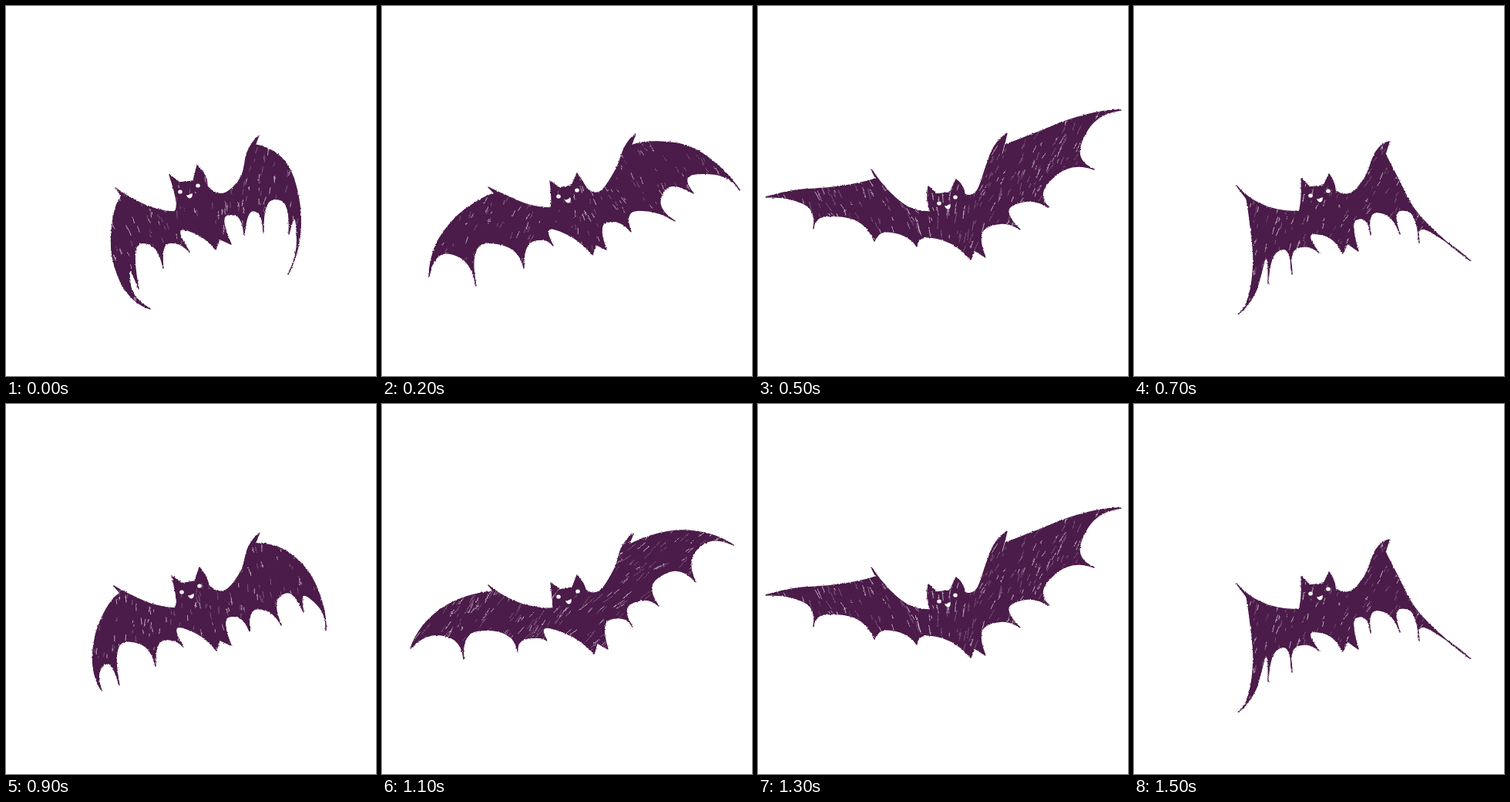
An HTML page for the animation above (1.6 s loop, 480 px wide and 480 px high).

```html
<!DOCTYPE html>
<html lang="en">
<head>
<meta charset="utf-8">
<title>Flapping bat</title>
<style>
  html, body { margin: 0; width: 100%; height: 100%; overflow: hidden; background: #fff; }
  svg { display: block; width: 100vw; height: 100vh; }
</style>
</head>
<body>
<svg viewBox="0 0 480 480">
  <defs>
    <filter id="rough" filterUnits="userSpaceOnUse" x="0" y="0" width="480" height="480" color-interpolation-filters="sRGB">
      <feTurbulence type="fractalNoise" baseFrequency="0.45" numOctaves="2" seed="4" result="n"/>
      <feDisplacementMap in="SourceGraphic" in2="n" scale="2.6" xChannelSelector="R" yChannelSelector="G"/>
    </filter>
    <clipPath id="inside"><path id="clip"/></clipPath>
  </defs>
  <g filter="url(#rough)">
    <path id="bat" fill="#4b1b49" stroke="#4b1b49" stroke-width="1.4" stroke-linejoin="round"/>
    <g clip-path="url(#inside)" fill="none" stroke-linecap="round">
      <path id="faint" stroke="#8a668a" stroke-width="0.8"/>
      <path id="bright" stroke="#d9cbd9" stroke-width="0.8"/>
    </g>
  </g>
  <path id="face" fill="#fff"/>
</svg>
<script>
const STEP = 100;
const $ = id => document.getElementById(id);

// Outline: smooth runs between corners, clockwise from the left thumb.
// face: left eye, right eye, mouth. hatch: left angle, right angle, length, count.
const down = {
  outline: "142,236 162,249 190,262 218,267/221,253 212,219/225,229/243,227/248,207/258,220 261,234/" +
    "283,243 305,222 313,190 328,168/323,180/361,201 379,246 381,300 366,348/377,314 375,276 367,296/" +
    "362,256 340,255 334,294/329,270 316,268 309,297/301,273 283,275 292,309/277,302/272,316/" +
    "250,297 226,291 238,319/222,308 206,311 204,340/191,312 169,313 172,367/161,343 164,371 187,393/" +
    "156,370 138,325 139,276 150,246",
  face: "226,241 249,233 238,246", hatch: [110, 80, 7, 800]
};
const opening = {
  outline: "138,235 161,246 190,258 219,262/220,249 218,227/230,236/246,233/253,217/260,228 265,236/" +
    "284,240 304,211 315,183 329,166/323,181/358,176 400,183 436,207 464,239/440,220 399,220 404,243/" +
    "373,234 361,257 380,279/352,267 323,268 323,293/305,280 286,285 291,316/277,309/273,323/" +
    "249,301 218,289 222,311/208,303 189,310 184,340/165,313 125,312 122,363/107,330 77,322 61,351/" +
    "70,310 94,276 121,255 146,243",
  face: "229,247 253,239 241,252", hatch: [65, 120, 7, 750]
};
const rising = {
  outline: "138,235 160,250 190,262 222,265/221,250 219,232/231,241/247,238/253,222/260,231 264,241/" +
    "283,242 302,213 311,186 326,168/320,183/352,170 387,164 425,169 456,183/424,178 402,199 407,231/" +
    "380,216 351,233 359,262/340,254 318,264 325,289/311,278 290,284 293,318/279,310/275,324/" +
    "248,302 213,290 214,307/201,303 181,307 176,321/158,297 116,297 106,331/94,306 64,300 37,317/" +
    "53,288 78,265 110,250 145,243",
  face: "229,250 254,243 242,256", hatch: [55, 38, 12, 1100]
};
const up = {
  outline: "157,201 181,226 200,258 226,268/220,253 221,236/232,247/250,245/258,229/264,238 268,246/" +
    "282,240 290,205 301,174 315,154/314,176/347,148 383,129 420,121 457,119/420,135 408,178 433,197/" +
    "402,194 375,219 382,248/357,242 331,264 345,288/322,277 293,291 297,327/282,319/278,332/" +
    "252,308 206,298 193,319/184,288 141,278 128,292/114,255 70,243 54,261/58,235 44,211 12,203/" +
    "47,188 90,184 130,191 160,206",
  face: "236,257 257,251 246,263", hatch: [125, 32, 7, 800]
};
const falling = {
  outline: "147,212 170,241 195,261 224,267/220,252 221,234/232,244/249,242/257,225/265,234 268,244/" +
    "284,240 296,208 306,183 323,165/319,181/360,165 400,149 440,138 471,135/435,151 417,189 436,212/" +
    "400,211 371,237 377,261/350,253 325,264 340,290/316,282 291,293 295,326/281,317/276,329/" +
    "249,307 217,300 206,312/190,298 164,293 151,305/128,278 86,273 72,289/68,263 44,251 10,248/" +
    "50,239 90,236 125,231 153,224",
  face: "235,256 256,248 246,260", hatch: [115, 65, 11, 1000]
};
const folding = {
  outline: "133,233 155,252 185,264 214,266/217,250 217,224/228,235/246,233/253,218/259,229 261,239/" +
    "281,243 300,222 314,189 331,176/326,192/343,225 364,264 394,296 437,331/407,307 375,289 370,307/" +
    "361,270 341,268 345,296/330,272 309,270 307,297/300,278 285,281 291,318/277,308/271,321/" +
    "253,300 229,297 240,320/223,312 206,319 205,348/198,317 181,324 174,360/171,327 157,372 135,400/" +
    "149,377 155,330 151,285 146,250",
  face: "229,246 252,240 241,251", hatch: [75, 60, 8, 900]
};

function blend(a, b) {
  const mixText = (s, t) => {
    const other = t.match(/\d+/g);
    let i = 0;
    return s.replace(/\d+/g, n => Math.round((+n + +other[i++]) / 2));
  };
  return {
    outline: mixText(a.outline, b.outline),
    face: mixText(a.face, b.face),
    hatch: a.hatch.map((v, i) => (v + b.hatch[i]) / 2)
  };
}

const points = text => text.trim().split(" ").map(p => p.split(",").map(Number));
const fmt = p => p.map(v => v.toFixed(1)).join(" ");

function smooth(run) {
  if (run.length < 3) return "L" + fmt(run[1]);
  const ghost = (a, b, c) => a.map((v, k) => 3 * v - 3 * b[k] + c[k]);
  const n = run.length;
  const p = [ghost(run[0], run[1], run[2]), ...run, ghost(run[n - 1], run[n - 2], run[n - 3])];
  let d = "";
  for (let i = 1; i < n; i++) {
    const c1 = p[i].map((v, k) => v + (p[i + 1][k] - p[i - 1][k]) / 6);
    const c2 = p[i + 1].map((v, k) => v - (p[i + 2][k] - p[i][k]) / 6);
    d += "C" + [c1, c2, p[i + 1]].map(fmt).join(" ");
  }
  return d;
}

function outlinePath(text) {
  let last = null, d = "";
  for (const part of text.split("/")) {
    const run = points(part);
    if (last) run.unshift(last);
    else d = "M" + fmt(run[0]);
    d += smooth(run);
    last = run[run.length - 1];
  }
  return d + "Z";
}

function facePath(text) {
  const [left, right, mouth] = points(text);
  const eye = ([x, y]) => `M${x - 2.8} ${y}a2.8 2.6 0 1 0 5.6 0a2.8 2.6 0 1 0 -5.6 0Z`;
  const [x, y] = mouth;
  return eye(left) + eye(right) +
    `M${x - 4} ${y - 1}q2 1.2 4 -.6q2 -.2 3.6 -1.6q1 5.6 -2.6 6.6q-3.6 .2 -5 -4.4Z`;
}

function random(seed) {
  return () => (seed = (seed * 16807) % 2147483647) / 2147483647;
}

function scratches([left, right, length, count], seed) {
  const rnd = random(seed);
  const d = ["", ""];
  for (let i = 0; i < count; i++) {
    const x = 10 + rnd() * 462, y = 116 + rnd() * 280;
    const mix = Math.min(1, Math.max(0, (x - 200) / 90));
    const angle = (left + (right - left) * mix + (rnd() - 0.5) * 22) * Math.PI / 180;
    const len = length * (0.3 + rnd());
    d[rnd() < 0.55 ? 0 : 1] += `M${fmt([x, y])}l${fmt([len * Math.cos(angle), -len * Math.sin(angle)])}`;
  }
  return d;
}

const cycle = [down, blend(down, opening), opening, rising, up, falling, blend(falling, folding), folding]
  .map((pose, i) => ({
    outline: outlinePath(pose.outline),
    face: facePath(pose.face),
    marks: scratches(pose.hatch, 911 + i * 7753)
  }));

let shown = -1;
function draw(ms) {
  const i = Math.floor(ms / STEP) % cycle.length;
  if (i === shown) return;
  shown = i;
  const { outline, face, marks } = cycle[i];
  const set = (id, d) => $(id).setAttribute("d", d);
  set("bat", outline);
  set("clip", outline);
  set("face", face);
  set("faint", marks[0]);
  set("bright", marks[1]);
}

const start = performance.now();
function tick() {
  draw(performance.now() - start);
  requestAnimationFrame(tick);
}
tick();
</script>
</body>
</html>
```
